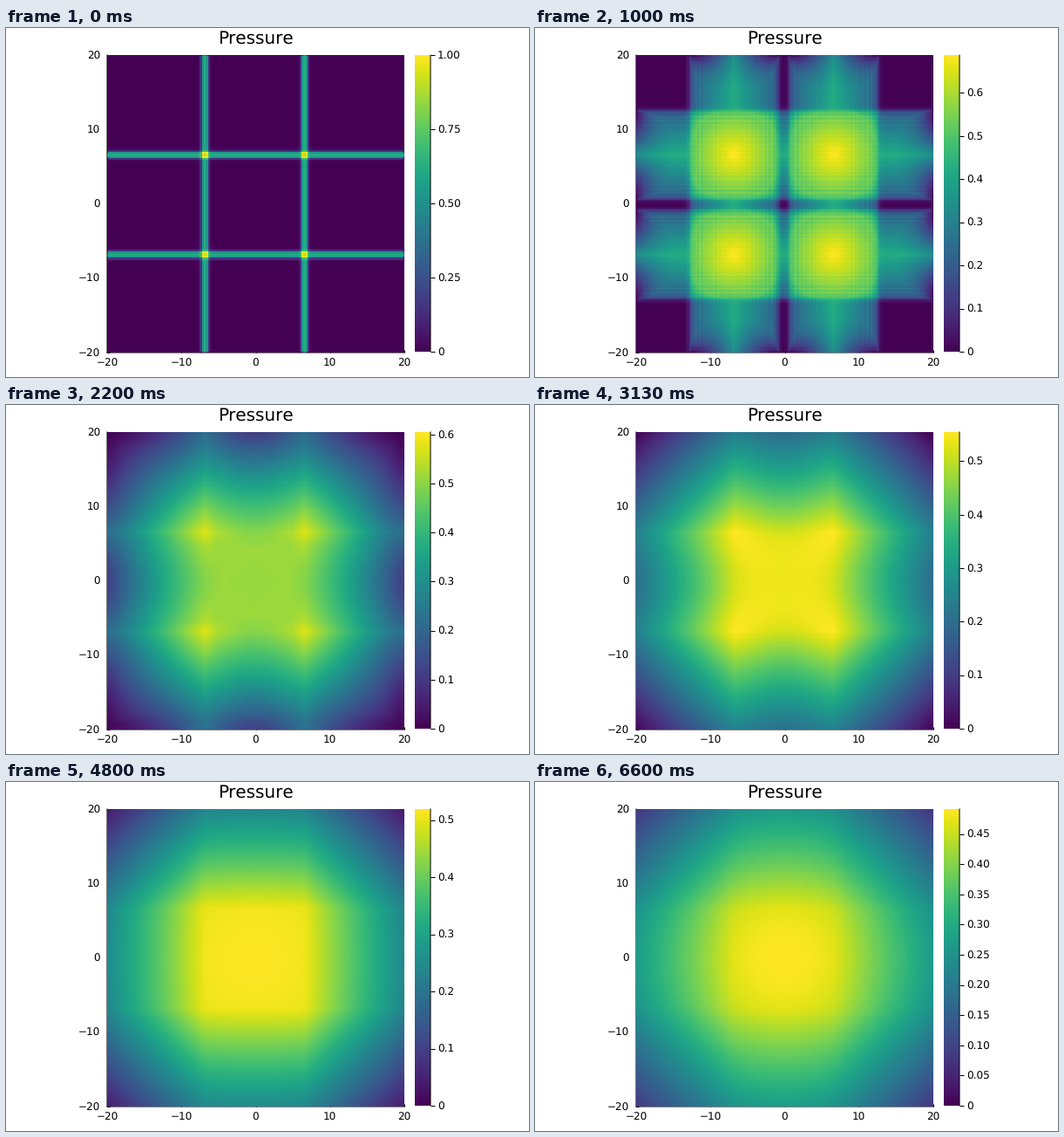
Animation, 600 px wide and 400 px high, one loop 6670 ms. Source, as a matplotlib script:

```python
import numpy as np
import matplotlib.pyplot as plt
from matplotlib.animation import FuncAnimation

W, H, DPI = 600, 400, 100
FRAMES, LOOP = 100, 6670
N = 150
PX = 72 / DPI  # points per pixel

plt.rcParams["font.family"] = "DejaVu Sans"
plt.rcParams["text.hinting"] = "none"
plt.rcParams["text.hinting_factor"] = 1

grid = np.linspace(-20, 20, N)
X, Y = np.meshgrid(grid, grid)
LINES = (grid[N // 3 - 1], grid[2 * N // 3 - 1])
MID = sum(LINES) / 2
HALF = (LINES[1] - LINES[0]) / 2

# peak pressure over time
PEAK_T = [0, 7, 15, 24, 47, 72, 99]
PEAK_V = [1.0, 0.833, 0.688, 0.634, 0.551, 0.5178, 0.4905]

# smooth regime: profile at centre, line and wall, corner lift, arm dip
LATE_T = [24, 47, 72, 99]
LATE = np.array([
    [0.280, 0.318, -0.120, 0.24, 0.080],
    [0.270, 0.275, -0.035, 0.07, 0.030],
    [0.2585, 0.250, -0.012, 0.06, 0.0],
    [0.2455, 0.224, 0.025, 0.03, 0.0],
])


def step(u):
    return 1 / (1 + np.exp(-np.clip(u, -40, 40)))


def smooth(u):
    u = np.clip(u, 0, 1)
    return u * u * (3 - 2 * u)


def band(d, s, r):
    """Wave of one line: d across it, s to its nearest end, r travelled."""
    peak = max(0.55 - 0.021 * r, 0) + 0.25 * np.exp(-r / 0.8)
    width = 11.5 + 0.3 * max(r - 9.3, 0)
    u = peak * np.maximum(1 - d / width, 0) * step((r - d) / (0.12 + 0.01 * r))
    lag = np.maximum(r - d, 0)
    ripple = np.cos(2 * np.pi * lag / 0.62 - 1.6) * np.exp(-lag / 2.2)
    u = u * (1 + 0.16 * np.exp(-r / 14) * ripple)
    reach = np.sqrt(np.maximum(r * r - d * d, 1e-6))
    end = 0.8 * np.maximum(1 - d / r, 0)
    inner = np.sin(np.pi / 2 * np.minimum(s / reach, 1))
    return u * (end + (1 - end) * inner)


def crossing(dx, dy, r):
    """Pressure lost inside the round wave of a crossing."""
    rho = np.hypot(dx, dy)
    skew = 1.8 * (np.abs(dx) + np.abs(dy) - rho) / r
    shape = np.maximum(1 - skew, 0) * np.maximum(1 - 0.3 * rho / r, 0)
    return 0.43 * np.exp(-r / 6) * shape * step((r - rho) / 0.2)


def waves(r):
    p = np.zeros_like(X)
    for c in LINES:
        p += band(np.abs(X - c), 20 - np.abs(Y), r)
        p += band(np.abs(Y - c), 20 - np.abs(X), r)
    for cx in LINES:
        for cy in LINES:
            p -= crossing(X - cx, Y - cy, r)
    return p


def settled(n):
    a, b, c, lift, dip = (np.interp(n, LATE_T, col) for col in LATE.T)

    def parts(v):
        v = np.abs(v - MID)
        inn = np.minimum(v / HALF, 1)
        out = np.clip((v - HALF) / (20 - HALF), 0, 1)
        return inn, out, a + (b - a) * inn ** 2 + (c - b) * out

    ix, ox, fx = parts(X)
    iy, oy, fy = parts(Y)
    return fx + fy + lift * ox * oy - dip * (ix ** 2 - iy ** 2) ** 2


def pressure(n):
    w = smooth((n - 24) / 15)
    p = np.zeros_like(X)
    if w < 1:
        p += (1 - w) * waves(0.372 * (n + 1))
    if w > 0:
        p += w * settled(n)
    return np.maximum(p, 0)


def bar_ticks(top):
    if top >= 0.9:
        gap, digits = 0.25, 2
    elif top >= 0.5:
        gap, digits = 0.1, 1
    else:
        gap, digits = 0.05, 2
    vals = np.arange(int(top / gap + 1e-6) + 1) * gap
    return vals / top, ["0"] + [f"{v:.{digits}f}" for v in vals[1:]]


def add_axes(x0, y0, x1, y1, sides):
    a = fig.add_axes([x0 / W, 1 - y1 / H, (x1 - x0) / W, (y1 - y0) / H])
    for side, spine in a.spines.items():
        spine.set_visible(side in sides)
        spine.set_linewidth(PX)
        spine.set_snap(False)
    return a


fig = plt.figure(figsize=(W / DPI, H / DPI), dpi=DPI, facecolor="white")
fig.text(286 / W, 1 - 18 / H, "Pressure", size=20.5 * PX, ha="center", va="baseline")

ax = add_axes(116, 31, 457, 372, ("left", "bottom"))
edge = 20 + (grid[1] - grid[0]) / 2
img = ax.imshow(pressure(0), origin="lower", extent=[-edge, edge, -edge, edge],
                cmap="viridis", vmin=0, vmax=1, interpolation="nearest",
                aspect="auto", zorder=3)
ax.set(xlim=(-20, 20), ylim=(-20, 20))
ax.set_xticks(range(-20, 21, 10))
ax.set_yticks(range(-20, 21, 10))
ax.set_axisbelow(True)
ax.tick_params(direction="in", length=3 * PX, width=PX, labelsize=11.7 * PX)
ax.tick_params(axis="x", pad=6.5 * PX)
ax.tick_params(axis="y", pad=8 * PX)
for spine in ax.spines.values():
    spine.set_zorder(1)

cax = add_axes(469, 31, 487, 371, ("right",))
cax.imshow(np.linspace(0, 1, 256)[:, None], origin="lower", extent=[0, 1, 0, 1],
           cmap="viridis", aspect="auto")
cax.set_xticks([])
cax.yaxis.tick_right()
cax.tick_params(axis="y", length=5 * PX, width=PX, pad=3 * PX, labelsize=11.7 * PX)


def draw(n):
    top = np.interp(n, PEAK_T, PEAK_V)
    img.set_data(pressure(n))
    img.set_clim(0, top)
    pos, labels = bar_ticks(top)
    cax.set_yticks(pos, labels=labels)
    cax.set_ylim(0, 1)
    return [img]


anim = FuncAnimation(fig, draw, frames=FRAMES, interval=LOOP / FRAMES,
                     repeat=True, repeat_delay=0, blit=False)
plt.show()
```
